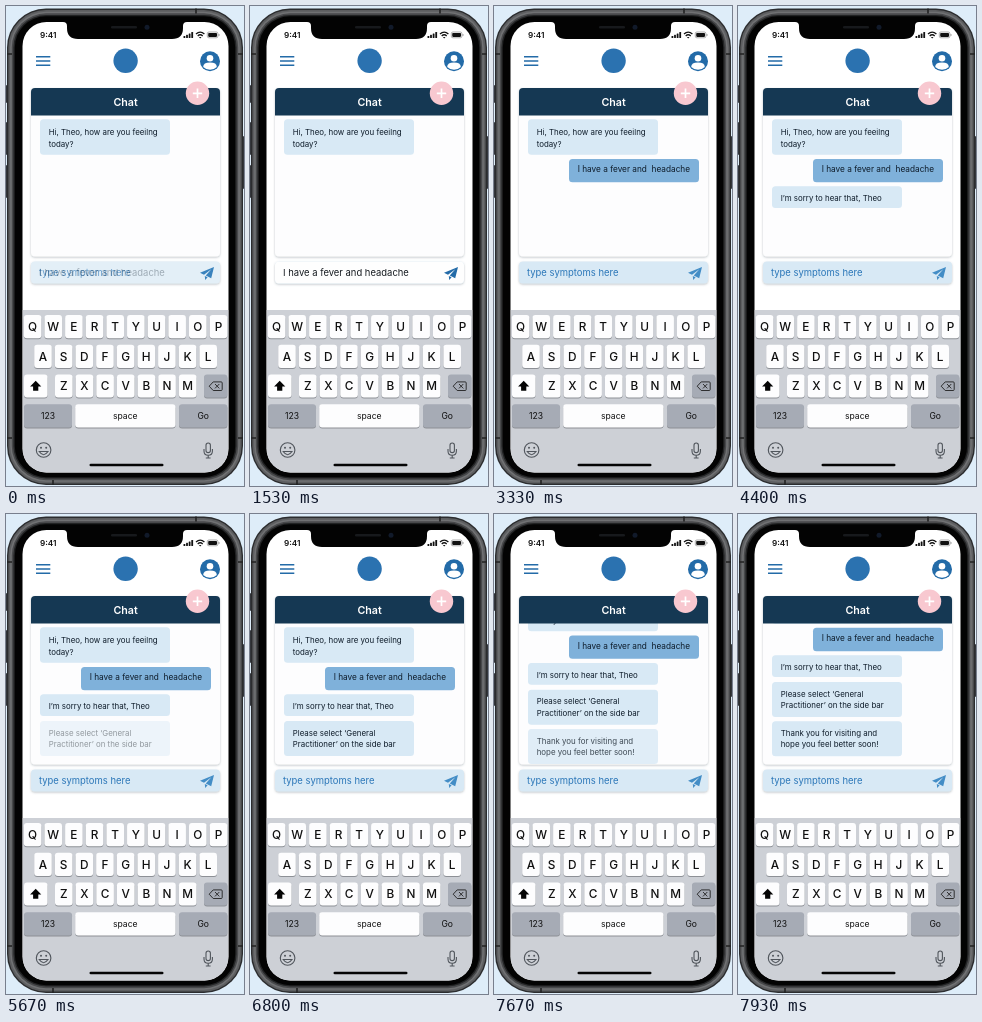
An HTML page for the animation above (8000 ms loop, 238 by 480 pixels).

```html
<!DOCTYPE html>
<html lang="en">
<head>
<meta charset="utf-8">
<title>Symptom chat</title>
<style>
  html, body { margin: 0; width: 100%; height: 100%; overflow: hidden; background: #deedf9; }
  svg { display: block; width: 100vw; height: 100vh; }
  text { font-family: Inter, "Open Sans", sans-serif; }
  .bubble text { font-size: 7.9px; fill: #0e1c2a; }
  .field { font-size: 9.45px; }
  .key { font-size: 11.8px; font-weight: 500; fill: #111; text-anchor: middle; }
  .label { font-size: 8.6px; fill: #111; text-anchor: middle; }
</style>
</head>
<body>
<svg id="stage" viewBox="0 0 238 480" preserveAspectRatio="none"></svg>
<script>
const LOOP = 8000;
const FADE = 800;
const SCROLL = 39.3;
const BLUE = '#236ba8';
const PALE = '#d8e9f5';
const GREY_KEY = '#a6abb5';

const rect = (x, y, w, h, r, fill, extra = '') =>
  `<rect x="${x}" y="${y}" width="${w}" height="${h}" rx="${r}" fill="${fill}" ${extra}/>`;

const label = (x, y, str, attrs = '') =>
  `<text x="${x}" y="${y}" xml:space="preserve" ${attrs}>${str}</text>`;

const bubble = (id, x, y, h, fill, baseline, lines, attrs = '') =>
  `<g id="${id}" class="bubble">${rect(x, y, 130, h, 3.5, fill)}` +
  lines.map((line, i) => label(x + 8.7, baseline + i * 11.6, line, attrs)).join('') + '</g>';

const key = (x, y, w, fill = '#fdfdfe') =>
  rect(x, y + 1, w, 23.2, 3, '#8d9096') + rect(x, y, w, 23.2, 3, fill);

const keyRow = (letters, firstCentre, y) => [...letters].map((letter, i) => {
  const cx = firstCentre + i * 20.65;
  return key(cx - 8.8, y, 17.6) + label(cx, y + 15.9, letter, 'class="key"');
}).join('');

// Phone body outline, inset from its outer edge.
const shell = (inset, fill) =>
  rect(1 + inset, 2.5 + inset, 236 - 2 * inset, 476.5 - 2 * inset, 39 - inset, fill);

const phone = () => `
  ${[79, 116, 159].map((y, i) => rect(0, y, 3, i ? 33 : 18, 1, '#33363b')).join('')}
  ${rect(235, 130, 3, 53, 1, '#33363b')}
  ${shell(0, '#2b2c2e')}
  ${shell(1.4, '#5d5e60')}
  ${shell(3.2, '#707173')}
  ${shell(4.8, '#48494b')}
  ${shell(6.4, '#222324')}
  ${shell(7.8, '#030303')}
  <path d="M190 2.5 v5 M47 474 v5 M1 48 h5 M232 48 h5 M1 432 h5 M232 432 h5" stroke="#222" stroke-width="1.6"/>
  ${rect(16.5, 16, 206, 450.5, 24, '#fff')}
  <path d="M57 16 q4 0 4 4 v2 q0 11 11 11 h94 q11 0 11 -11 v-2 q0 -4 4 -4z" fill="#030303"/>
  ${rect(105, 20, 26, 2.6, 1.3, '#17191c')}
  <circle cx="141" cy="21.3" r="2.5" fill="#111a2a"/>`;

const statusBar = () => `
  ${label(34, 32, '9:41', 'font-size="8.2" font-weight="600" fill="#111"')}
  ${[0, 1, 2, 3].map(i => rect(177.5 + i * 2.6, 30 - i * 1.3, 1.8, 2 + i * 1.3, 0.5, '#111')).join('')}
  <g fill="none" stroke="#111" stroke-width="1.3">
    <path d="M190 28 q4.2 -3.8 8.4 0"/><path d="M191.7 29.9 q2.5 -2.2 5 0"/>
  </g>
  <path d="M192.9 31 h2.6 l-1.3 1.4z" fill="#111"/>
  ${rect(201.3, 26, 10.6, 5.8, 1.6, 'none', 'stroke="#777" stroke-width=".6"')}
  ${rect(202.2, 26.9, 8.8, 4, 0.8, '#111')}
  ${rect(212.6, 27.9, 0.8, 2, 0.4, '#777')}`;

const topBar = () => `
  <path d="M30 50.7 h14.3 M30 55 h14.3 M30 59.3 h14.3" stroke="${BLUE}" stroke-width="1.5"/>
  <circle cx="119.6" cy="54.8" r="12.2" fill="#2b72b0"/>
  <circle cx="204" cy="55.2" r="10" fill="${BLUE}"/>
  <circle cx="204" cy="52.2" r="3.3" fill="#fff"/>
  <path d="M197.2 61 q0 -4.4 6.8 -4.4 t6.8 4.4 q-2.6 2.7 -6.8 2.7 t-6.8 -2.7z" fill="#fff"/>`;

const chat = () => `
  ${rect(25, 82, 189, 168.5, 4, '#fdfdfe', 'filter="url(#shadow)"')}
  <g clip-path="url(#panel)"><g id="messages">
    ${bubble('greeting', 34, 113.3, 35.4, PALE, 129, ['Hi, Theo, how are you feeilng', 'today?'])}
    ${bubble('reply', 75, 152.9, 23.3, '#7fb1da', 166.2, ['I have a fever and  headache'], 'style="font-size:8.25px"')}
    ${bubble('sorry', 34, 180.3, 21.7, PALE, 195, ['I’m sorry to hear that, Theo'])}
    ${bubble('advice', 34, 207, 35, PALE, 221.8, ['Please select ‘General', 'Practitioner’ on the side bar'])}
    ${bubble('thanks', 34, 246.3, 35, PALE, 260.9, ['Thank you for visiting and', 'hope you feel better soon!'])}
  </g></g>
  <path d="M25 109.4 V86 q0 -4 4 -4 h181 q4 0 4 4 v23.4z" fill="#153853"/>
  ${label(119.6, 100, 'Chat', 'font-size="10.7" font-weight="600" fill="#fff" text-anchor="middle"')}
  <circle cx="191.5" cy="87.3" r="11.7" fill="#f8c8d0"/>
  <path d="M186.8 87.3 h9.4 M191.5 82.6 v9.4" stroke="#fff" stroke-width="1.7"/>`;

const sendIcon = fill =>
  `<path d="M208 261 L194 266.8 L198 268.8 L205.3 263.3 L199.8 269.6 L205.2 272.3z M198.8 269.9 L199.2 274 L201.6 271.2z" fill="${fill}"/>`;

const inputField = () => `
  ${rect(25, 255.5, 189, 22, 4, PALE, 'filter="url(#shadow)"')}
  ${label(33, 269.8, 'type symptoms here', 'class="field" fill="#2a76b8"')}
  ${sendIcon('#438dc6')}
  <g id="typed">
    ${rect(25, 255.5, 189, 22, 4, '#fefefe')}
    ${label(33, 269.8, 'I have a fever and headache', 'class="field" fill="#161b20"')}
    ${sendIcon(BLUE)}
  </g>`;

const keyboard = () => `
  <g clip-path="url(#screen)">${rect(16.5, 304, 206, 163, 0, '#cdd0d6')}</g>
  ${keyRow('QWERTYUIOP', 26.6, 309)}
  ${keyRow('ASDFGHJKL', 37, 338.7)}
  ${key(18, 368.4, 23.5)}
  <path d="M29.7 374.8 l5.6 5.7 h-3 v4.3 h-5.2 v-4.3 h-3z" fill="#050505"/>
  ${keyRow('ZXCVBNM', 57.8, 368.4)}
  ${key(198, 368.4, 23.3, GREY_KEY)}
  <path d="M203.2 380.2 l4 -4.3 h8 q1 0 1 1 v6.6 q0 1 -1 1 h-8z M209 378 l4.3 4.4 M213.3 378 l-4.3 4.4" fill="none" stroke="#222" stroke-width=".9"/>
  ${key(18, 398.2, 48, GREY_KEY)}${label(42, 413.2, '123', 'class="label"')}
  ${key(69.2, 398.2, 100.3)}${label(119.3, 413, 'space', 'class="label"')}
  ${key(173, 398.2, 48.3, GREY_KEY)}${label(197.2, 413.2, 'Go', 'class="label"')}
  <g fill="none" stroke="#50555c" stroke-width="1.1">
    <circle cx="37.6" cy="444" r="7.3"/>
    <path d="M33.2 445.5 q4.4 6.4 8.8 0z"/>
    <path d="M198 443 v2 q0 4.3 4.2 4.3 t4.2 -4.3 v-2 M202.2 449.3 v2.8 M199.8 452 h4.8"/>
    ${rect(200, 437, 4.4, 9.6, 2.2, 'none')}
  </g>
  <circle cx="35" cy="441.7" r="1" fill="#50555c"/><circle cx="40.2" cy="441.7" r="1" fill="#50555c"/>
  ${rect(83.5, 457.7, 74, 2.6, 1.3, '#050505')}`;

const stage = document.getElementById('stage');
stage.innerHTML = `
  <defs>
    <filter id="shadow" x="-5%" y="-20%" width="110%" height="150%">
      <feDropShadow dx="0" dy="1" stdDeviation="1" flood-color="#526270" flood-opacity=".38"/>
    </filter>
    <clipPath id="panel">${rect(25, 82, 189, 168.5, 4, '#000')}</clipPath>
    <clipPath id="screen">${rect(16.5, 16, 206, 450.5, 24, '#000')}</clipPath>
  </defs>
  ${rect(0, 0, 238, 480, 0, '#deedf9')}
  ${phone()}${statusBar()}${topBar()}${chat()}${inputField()}${keyboard()}`;

// Cubic-bezier(0, 0, .58, 1), solved by bisection.
function easeOut(x) {
  if (x <= 0) return 0;
  if (x >= 1) return 1;
  let low = 0, high = 1;
  for (let i = 0; i < 20; i++) {
    const s = (low + high) / 2;
    if (1.74 * s * s * (1 - s) + s ** 3 < x) low = s; else high = s;
  }
  return low * low * (3 - 2 * low);
}

const el = id => document.getElementById(id);
const setOpacity = (id, value) => el(id).setAttribute('opacity', value);

function draw(now) {
  const t = now % LOOP;
  const progress = start => easeOut((t - start) / FADE);
  const sent = progress(1770);
  const scrolled = progress(7180);
  setOpacity('typed', progress(-150) * (1 - sent));
  setOpacity('reply', sent);
  setOpacity('sorry', progress(3500));
  setOpacity('advice', progress(5430));
  setOpacity('thanks', scrolled);
  el('messages').setAttribute('transform', `translate(0 ${-SCROLL * scrolled})`);
}

const begin = performance.now();
function tick() {
  draw(performance.now() - begin);
  requestAnimationFrame(tick);
}
tick();
</script>
</body>
</html>
```
